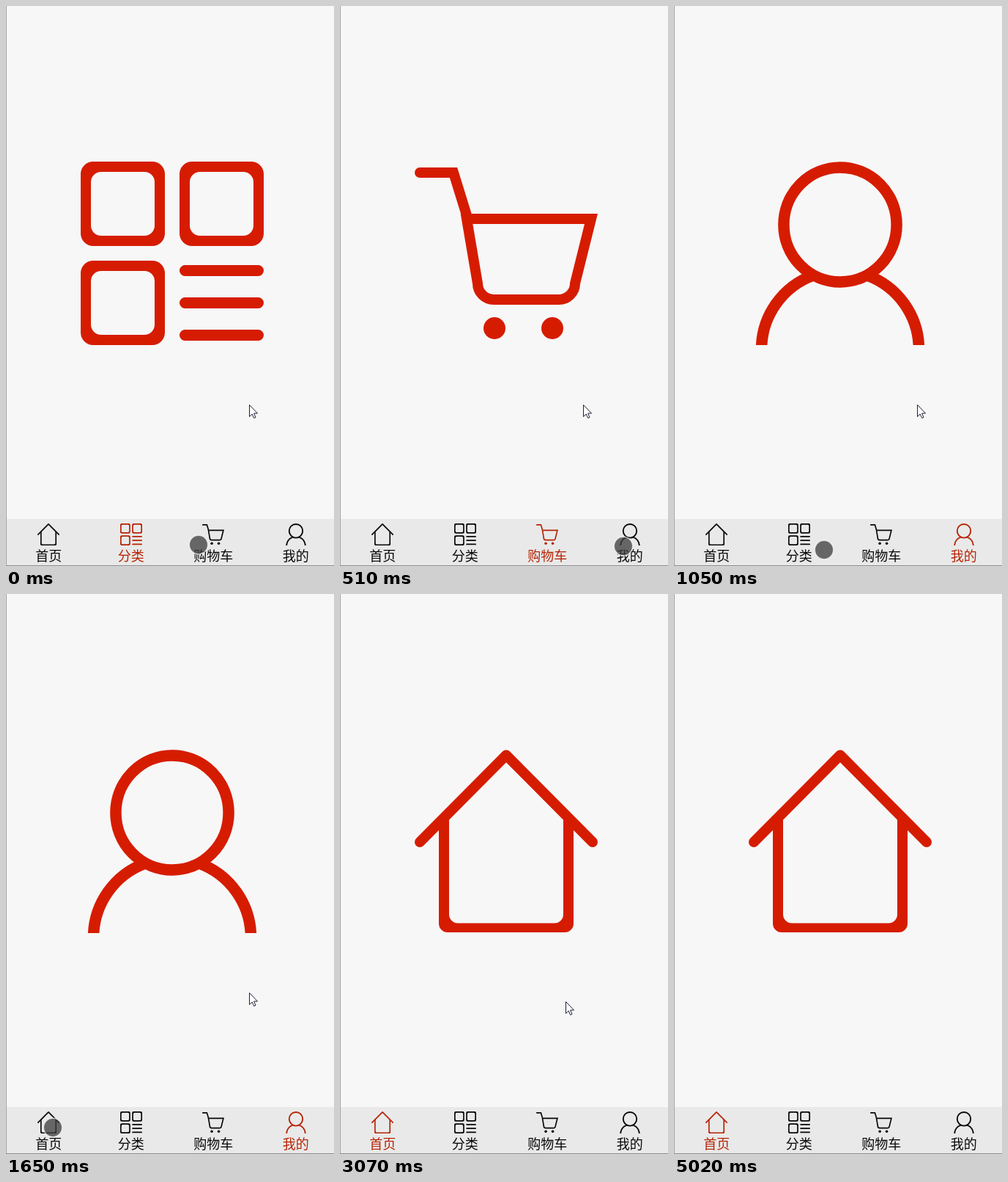
An HTML page that plays this animation: 448 by 763 pixels, repeating every 6.61 s.

```html
<!DOCTYPE html>
<html lang="zh-CN">
<head>
<meta charset="utf-8">
<title>底部导航</title>
<style>
html, body { margin: 0; width: 100%; height: 100%; overflow: hidden; background: #f7f7f7; }
svg { display: block; }
#stage { position: absolute; left: 0; top: 0; }
.icon { fill: none; stroke: currentColor; }
.solid { fill: currentColor; stroke: none; fill-rule: evenodd; }
#big { color: #d61c00; }
.tab { color: #080808; }
.tab.on { color: #b62405; }
.tab text { font: 350 18px "Noto Sans CJK SC", "Noto Sans CJK", sans-serif; fill: currentColor; text-anchor: middle; }
</style>
</head>
<body>
<svg id="stage" width="448" height="763" viewBox="0 0 448 763">
  <defs>
    <symbol id="home" viewBox="0 0 250 250">
      <path class="icon" d="M7 126L125 7.5L243 126" stroke-width="14" stroke-linecap="round" stroke-linejoin="round"/>
      <path class="solid" d="M33 100V237a12 12 0 0 0 12 12H205a12 12 0 0 0 12-12V100L203 86V224.5a12 12 0 0 1-12 12H59a12 12 0 0 1-12-12V86z"/>
    </symbol>
    <symbol id="sort" viewBox="0 0 250 250">
      <path id="cell" class="solid" d="M17 0H98a17 17 0 0 1 17 17V98a17 17 0 0 1-17 17H17a17 17 0 0 1-17-17V17a17 17 0 0 1 17-17z
        M28 14H87a14 14 0 0 1 14 14V87a14 14 0 0 1-14 14H28a14 14 0 0 1-14-14V28a14 14 0 0 1 14-14z"/>
      <use href="#cell" x="135"/>
      <use href="#cell" y="135"/>
      <path class="icon" d="M142.5 148.5h100m-100 44h100m-100 44h100" stroke-width="15" stroke-linecap="round"/>
    </symbol>
    <symbol id="cart" viewBox="0 0 250 250">
      <path class="icon" d="M7 15H53L71 73" stroke-width="14"/>
      <path class="icon" d="M71 78L86 166A22 22 0 0 0 108 188H196A22 22 0 0 0 219 166L241 78z" stroke-width="14"/>
      <g class="solid">
        <circle cx="7" cy="15" r="7"/>
        <circle cx="109" cy="227" r="15"/>
        <circle cx="188" cy="227" r="15"/>
      </g>
    </symbol>
    <symbol id="user" viewBox="0 0 250 250">
      <g class="icon" stroke-width="15.5">
        <ellipse cx="125" cy="86" rx="77.1" ry="78"/>
        <path d="M17.5 256A107.5 107.5 0 0 1 88.9 154.8M161.1 154.8A107.5 107.5 0 0 1 232.5 256"/>
      </g>
    </symbol>
  </defs>
  <rect width="448" height="763" fill="#f7f7f7"/>
  <use id="big" x="102" y="212" width="250" height="250"/>
  <rect y="699" width="448" height="64" fill="#e9e9e9"/>
  <g id="tabs"></g>
  <path d="M.5 0V763" stroke="#a6a6a6"/>
  <path d="M0 762.5H448" stroke="#8c8c8c"/>
  <circle id="touch" r="12.7" fill="#3c3c3c" fill-opacity=".76" stroke="#fff" stroke-opacity=".65" stroke-width="1.6"/>
  <path id="arrow" d="M.5 .5V16.5L4.2 13L6.7 18.5L9 17.5L6.6 12H11.5z" fill="#fff" stroke="#1c2036"/>
</svg>
<script>
const LOOP = 6610;
const TICK = 134; // the picture is refreshed in even steps
const LEAD = 30;

const TABS = { home: "首页", sort: "分类", cart: "购物车", user: "我的" };
const tabX = i => 58.25 + 112.5 * i;

// Where each pointer rests, with an optional sag of the path that leads there.
const touch = {
  end: 1900,
  keys: [
    { t: 120, x: 263, y: 734 },
    { t: 500, x: 387, y: 736 },
    { t: 630, x: 387, y: 736 },
    { t: 1445, x: 64, y: 727, sag: 10 }
  ]
};
const arrow = {
  end: 4930,
  keys: [
    { t: 2590, x: 332, y: 543 },
    { t: 3200, x: 305, y: 556 },
    { t: 3750, x: 305, y: 558 },
    { t: 4600, x: 293, y: 566 },
    { t: 4850, x: 251, y: 574 }
  ]
};

const el = id => document.getElementById(id);
const ease = p => p * p * (3 - 2 * p);
const mix = (a, b, p) => a + (b - a) * p;

function pageAt(t) {
  if (t < 120) return "sort";
  if (t < 630) return "cart";
  return t < 1770 ? "user" : "home";
}

function pointAt(keys, t) {
  const next = keys.findIndex(key => key.t > t);
  if (next === 0) return keys[0];
  if (next < 0) return keys.at(-1);
  const a = keys[next - 1], b = keys[next];
  const p = ease((t - a.t) / (b.t - a.t));
  return { x: mix(a.x, b.x, p), y: mix(a.y, b.y, p) + (b.sag || 0) * Math.sin(Math.PI * p) };
}

function place(node, { keys, end }, t) {
  const { x, y } = pointAt(keys, t);
  node.style.display = t < end ? "" : "none";
  node.setAttribute("transform", `translate(${Math.round(x)} ${Math.round(y)})`);
}

el("tabs").innerHTML = Object.entries(TABS).map(([id, label], i) =>
  `<g class="tab" id="tab-${id}">
    <use href="#${id}" x="${Math.round(tabX(i) - 15)}" y="705" width="30" height="30"/>
    <text x="${tabX(i)}" y="756">${label}</text>
  </g>`).join("");

function draw(t) {
  const page = pageAt(t);
  el("big").setAttribute("href", "#" + page);
  for (const id in TABS) el("tab-" + id).classList.toggle("on", id === page);
  const step = Math.floor((t + LEAD) / TICK) * TICK;
  place(el("touch"), touch, step);
  place(el("arrow"), arrow, step);
}

const start = performance.now();
function tick() {
  draw((performance.now() - start) % LOOP);
  requestAnimationFrame(tick);
}
tick();
</script>
</body>
</html>
```
